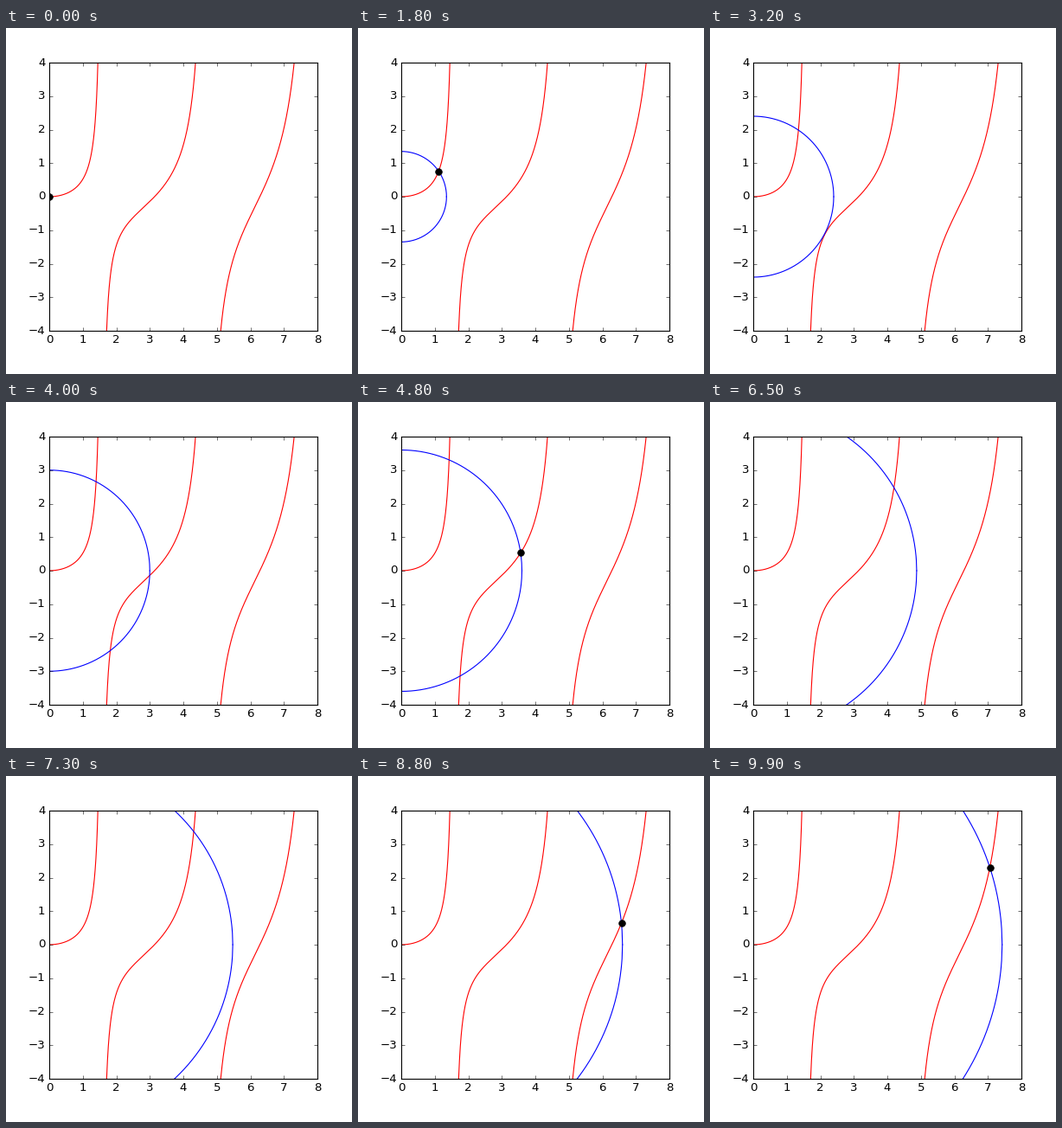
Write a matplotlib script that moves like this. It is 400 px wide and 400 px high and loops after 10 s.

```python
import numpy as np
import matplotlib.pyplot as plt
from matplotlib.animation import FuncAnimation

FRAMES = 100
R_MAX = 7.5
RATIO = 3.0

plt.style.use("classic")
plt.rcParams["font.family"] = "DejaVu Sans"


def well(x):
    return x * np.tan(x) / RATIO


def crossing(r):
    """Point where the circle meets the rising branch that starts at k*pi."""
    k = np.floor(r / np.pi)
    if r - k * np.pi > np.pi / 2:
        return [], []
    lo, hi = k * np.pi, r
    for _ in range(50):
        mid = (lo + hi) / 2
        if well(mid) < np.sqrt(max(r * r - mid * mid, 0)):
            lo = mid
        else:
            hi = mid
    return [lo], [well(lo)]


fig = plt.figure(figsize=(5, 5), dpi=80, facecolor="white")
ax = fig.add_axes([0.125, 0.125, 0.775, 0.775])
ax.set_xlim(0, 8)
ax.set_ylim(-4, 4)

# One curve per branch of the tangent
for k in range(3):
    start = max(0, (k - 0.5) * np.pi + 0.01)
    x = np.linspace(start, (k + 0.5) * np.pi - 0.01, 1000)
    ax.plot(x, well(x), "r-", lw=1)

upper, = ax.plot([], [], "b-", lw=1)
lower, = ax.plot([], [], "b-", lw=1)
dot, = ax.plot([], [], "ko", ms=7, mew=0.5)


def update(i):
    r = R_MAX * i / FRAMES
    x = np.linspace(0, r, 500)
    y = np.sqrt(np.maximum(r * r - x * x, 0))
    upper.set_data(x, y)
    lower.set_data(x, -y)
    dot.set_data(*crossing(r))
    return upper, lower, dot


anim = FuncAnimation(fig, update, frames=FRAMES, interval=100,
                     repeat=True, repeat_delay=0)
plt.show()
```
